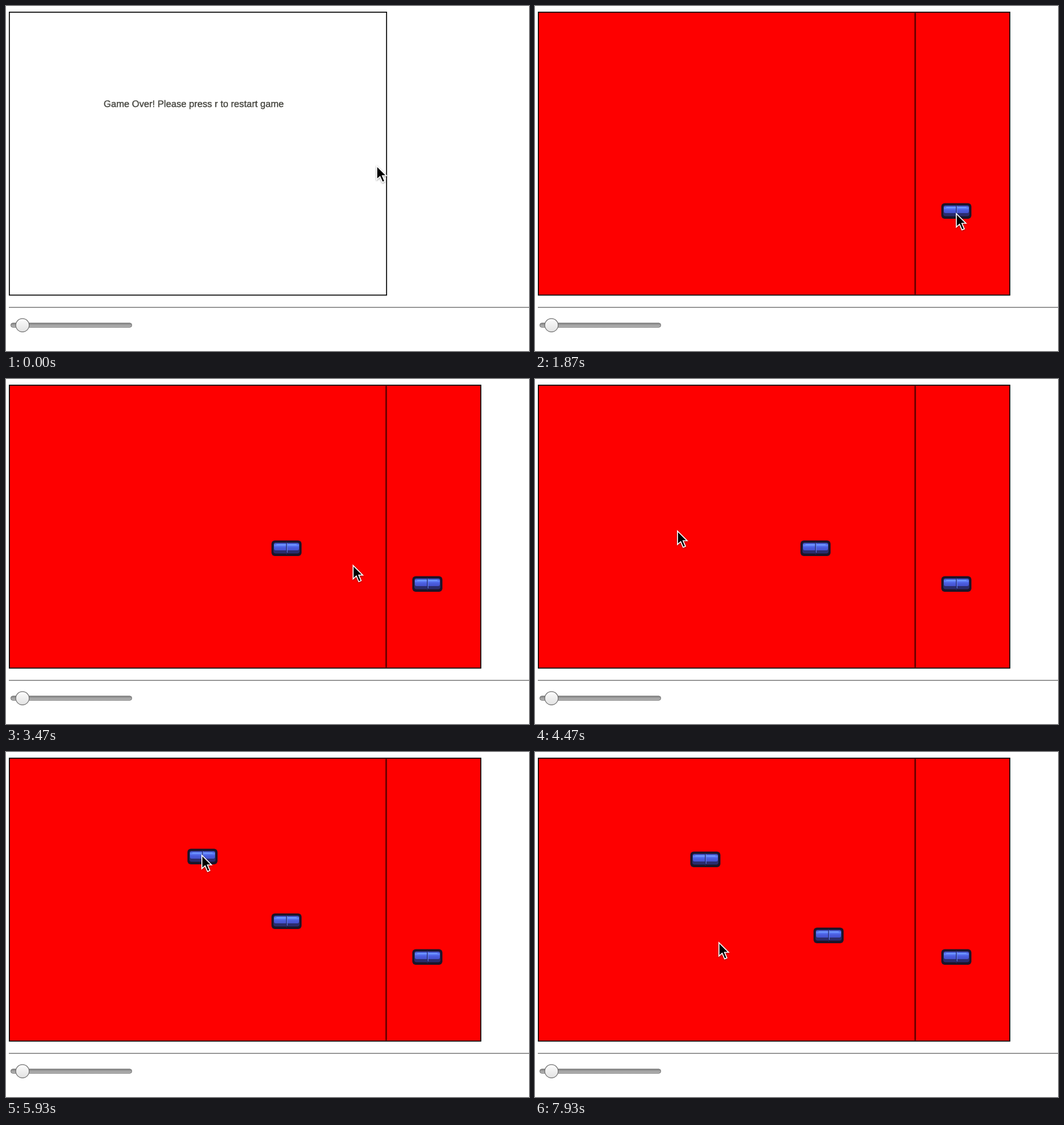
Write an HTML page that moves like this. It is 921 px wide and 608 px high and loops after 8000 ms.

```html
<!DOCTYPE html>
<html lang="en">
<head>
<meta charset="utf-8">
<title>Drag the blocks</title>
<style>
  html, body { margin: 0; width: 100%; height: 100%; overflow: hidden; background: #fff; }
  svg { display: block; width: 921px; height: 608px; }
  .message {
    font: 16.6px "Liberation Sans", Arial, sans-serif;
    text-rendering: geometricPrecision;
    fill: #45453f; stroke: #45453f; stroke-width: .4px;
  }
  .frame { stroke: #000; stroke-width: 1.7px; }
  .arrow { filter: drop-shadow(0 1.5px 1.5px rgba(0, 0, 0, .4)); }
</style>
</head>
<body>
<svg viewBox="0 0 921 608">
  <defs>
    <linearGradient id="groove" x2="0" y2="1">
      <stop offset="0" stop-color="#858585"/><stop offset="1" stop-color="#bdbdbd"/>
    </linearGradient>
    <linearGradient id="knob" x2="0" y2="1">
      <stop offset="0" stop-color="#fdfdfd"/><stop offset="1" stop-color="#e2e2e2"/>
    </linearGradient>
    <linearGradient id="gloss" x2="0" y2="1">
      <stop offset="0" stop-color="#3b48b8"/><stop offset=".3" stop-color="#6486ff"/>
      <stop offset=".55" stop-color="#4c60e2"/><stop offset="1" stop-color="#4450cc"/>
    </linearGradient>
    <g id="block">
      <rect x="-26.5" y="-13.5" width="53" height="27.5" rx="6" fill="#1b1528"/>
      <rect x="-23" y="-10" width="46" height="19.5" rx="4" fill="#2b2c6c"/>
      <rect x="-22" y="-9" width="44" height="13" rx="3" fill="url(#gloss)"/>
      <rect x="-18" y="-7" width="36" height="2" rx="1" fill="#6f98ff"/>
      <rect x="-.7" y="-11" width="1.4" height="22" fill="#20255e"/>
      <rect x=".7" y="-9" width="1" height="17" fill="#6d86ee"/>
    </g>
  </defs>

  <g id="over">
    <rect class="frame" x="5.9" y="10.9" width="664.3" height="498.6" fill="#fff"/>
    <text class="message" x="172" y="177.5">Game Over! Please press r to restart game</text>
  </g>

  <g id="board">
    <rect class="frame" x="5.9" y="10.9" width="830.3" height="498.6" fill="#fe0000"/>
    <rect x="668" y="11.7" width="3" height="497" fill="#700000"/>
    <use href="#block" x="742" y="361"/>
    <use href="#block" id="low"/>
    <use href="#block" id="high"/>
  </g>

  <rect x="5" y="530.3" width="916" height="1.7" fill="#858585"/>
  <rect x="8.5" y="558.8" width="213" height="7.4" rx="3.5" fill="url(#groove)" stroke="#707070"/>
  <circle cx="29" cy="562.6" r="11.8" fill="url(#knob)" stroke="#6c6c6c" stroke-width="1.2"/>

  <g id="cursor">
    <path class="arrow" d="M.9 2V25.7L6.6 20.6 10.9 30.6 15 28.8 10.8 19H17.9Z"
          fill="#000" stroke="#fff" stroke-width="1.7"/>
  </g>
</svg>
<script>
  const LOOP = 8000, STEP = 1000 / 15;
  const byId = id => document.getElementById(id);
  const show = (el, on) => { el.style.display = on ? "" : "none"; };
  const place = (el, x, y) => el.setAttribute("transform", `translate(${x} ${y})`);

  const easeOut = k => 1 - (1 - k) ** 5;

  // Each flick of the mouse starts where the last one came to rest
  const home = { x: 652, y: 280 };
  const flicks = [
    { from: 0, to: 3, x: 651, y: 260 },
    { from: 22, to: 28, x: 741, y: 364 },
    { from: 34, to: 44, x: 444, y: 277 },
    { from: 47, to: 50, x: 492, y: 294 },
    { from: 51, to: 59, x: 735, y: 361 },
    { from: 64, to: 67, x: 250, y: 266 },
    { from: 67, to: 75, x: 344, y: 180 },
    { from: 89, to: 94, x: 284, y: 177 },
    { from: 100, to: 113, x: 480, y: 306 },
    { from: 115, to: 117, x: 503, y: 331 },
    { from: 117, to: 119, x: 323, y: 334 }
  ];

  // A block jumps to its new spot when it is dropped
  const drops = [
    { id: "low", at: 50, x: 494, y: 298 },
    { id: "high", at: 78, x: 346, y: 184 },
    { id: "high", at: 98, x: 300, y: 189 },
    { id: "low", at: 117, x: 517, y: 323 }
  ];

  function pointerAt(step) {
    let { x, y } = home;
    for (const f of flicks) {
      if (step < f.from) break;
      const k = easeOut(Math.min(1, (step - f.from) / (f.to - f.from)));
      x += (f.x - x) * k;
      y += (f.y - y) * k;
    }
    return [x, y];
  }

  function draw(step) {
    show(byId("over"), step < 1);
    show(byId("board"), step >= 1);
    for (const id of ["low", "high"]) {
      const drop = drops.filter(d => d.id === id && d.at <= step).pop();
      show(byId(id), drop);
      if (drop) place(byId(id), drop.x, drop.y);
    }
    place(byId("cursor"), ...pointerAt(step));
  }

  const start = performance.now();
  function tick() {
    const time = (performance.now() - start) % LOOP;
    draw(Math.floor((time + 5) / STEP) % (LOOP / STEP));
    requestAnimationFrame(tick);
  }
  tick();
</script>
</body>
</html>
```
